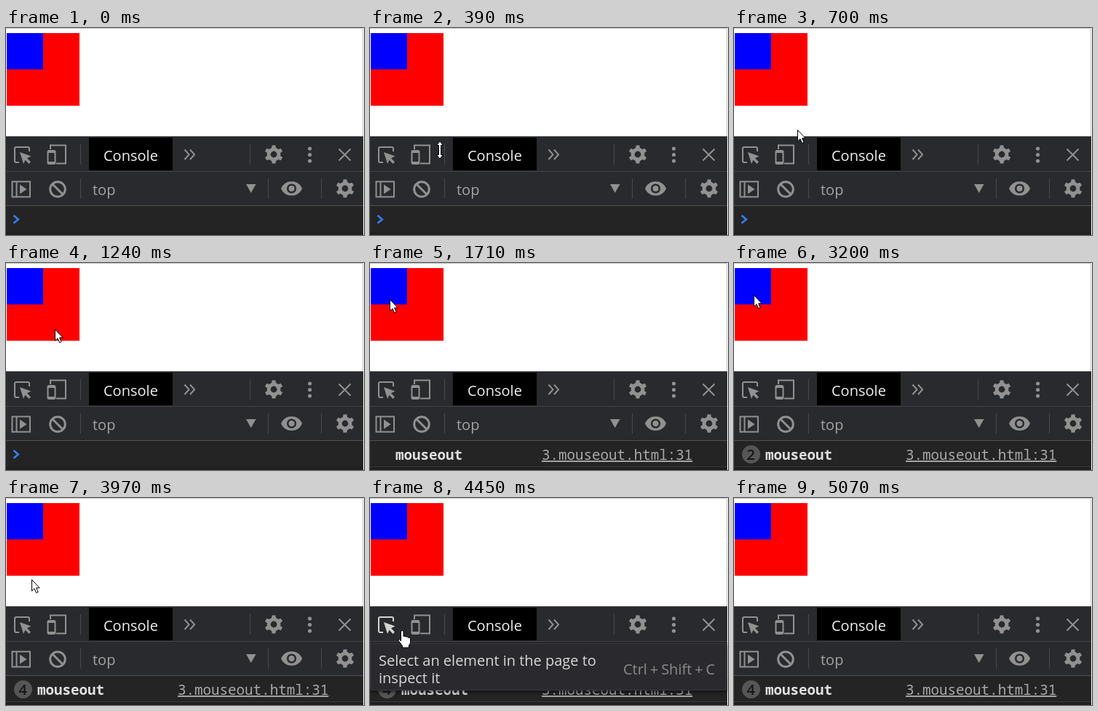
Animation of 492x285 px, one loop 5370 ms. Source, as an HTML page:

```html
<!DOCTYPE html>
<html lang="en">
<head>
<meta charset="utf-8">
<title>mouseout console</title>
<style>
  html, body { margin: 0; width: 100%; height: 100%; overflow: hidden; background: #fff; }
  svg { display: block; width: 492px; height: 285px; }
  text { font: 20px "Open Sans", "Noto Sans", sans-serif; white-space: pre; }
  .mono { font: 19.2px "Noto Sans Mono", "DejaVu Sans Mono", monospace; }
  .line { fill: none; stroke: #919191; stroke-width: 2; }
  .fill { fill: #919191; }
  .sep { stroke: #494a4d; stroke-width: 1; }
  .pointer { fill: #fff; stroke: #000; stroke-width: 1; stroke-linejoin: round; }
  #inspect.hover .line { stroke: #d4d4d4; }
  #inspect.hover .fill { fill: #d4d4d4; }
  .off { display: none; }
</style>
</head>
<body>
<svg viewBox="0 0 492 285">
  <defs>
    <path id="tooth" d="M-3.2-7 -2.4-12.5H2.4L3.2-7Z"/>
    <g id="gear" class="fill">
      <circle r="6.9" fill="none" stroke="#919191" stroke-width="5"/>
      <use href="#tooth"/>
      <use href="#tooth" transform="rotate(60)"/>
      <use href="#tooth" transform="rotate(120)"/>
      <use href="#tooth" transform="rotate(180)"/>
      <use href="#tooth" transform="rotate(240)"/>
      <use href="#tooth" transform="rotate(300)"/>
    </g>
    <filter id="shadow" x="-5%" y="-10%" width="110%" height="130%">
      <feDropShadow dx="0" dy="2" stdDeviation="2.5" flood-opacity=".6"/>
    </filter>
  </defs>

  <!-- page -->
  <path d="M0 .5H490.5V149" fill="none" stroke="#c4c4c4"/>
  <rect x="1" y="7" width="100" height="100" fill="#f00"/>
  <rect x="1" y="7" width="50" height="50" fill="#00f"/>

  <!-- panel -->
  <rect y="149" width="491" height="136" fill="#292a2d"/>
  <rect y="245" width="491" height="36" fill="#242424"/>
  <rect y="281" width="491" height="4" fill="#211e20"/>
  <path class="sep" d="M0 149.5H491M0 197.5H491" stroke-opacity=".8"/>
  <path d="M0 244.5H491" stroke="#505153"/>
  <path class="sep" d="M102.5 160V188M335.5 160V188M102.5 207V235M360.5 207V235M433.5 207V235"/>

  <!-- main toolbar -->
  <g id="inspect">
    <path class="line" d="M18 185H14Q12 185 12 183V166Q12 164 14 164H30Q32 164 32 166V170"/>
    <path class="fill" d="M19 171 34.5 176.5 29 179.2 34 184.5 31.5 187 26.5 181.8 24 187Z"/>
  </g>
  <path class="line" d="M61 167V161.5H82V186.5H69"/>
  <rect class="line" x="57.5" y="169" width="10" height="18" rx="1.5"/>
  <path class="line" d="M57.5 171H67.5M57.5 185H67.5"/>
  <rect x="114" y="151" width="115" height="45"/>
  <text x="134" y="183" fill="#f1f1f1">Console</text>
  <path class="line" d="M245.5 167.5 251.5 174.2 245.5 181M253 167.5 259 174.2 253 181"/>
  <use href="#gear" x="368" y="174"/>
  <g class="fill">
    <circle cx="417.5" cy="166" r="2.6"/>
    <circle cx="417.5" cy="174.5" r="2.6"/>
    <circle cx="417.5" cy="183" r="2.6"/>
  </g>
  <path class="line" stroke-width="2.5" d="M457.5 166.5 473.5 182.5M473.5 166.5 457.5 182.5"/>

  <!-- console toolbar -->
  <path class="line" d="M8.5 211.5H33V232.5H8.5ZM14.5 211.5V232.5"/>
  <path class="fill" d="M19 215.5 28.5 222 19 228.5Z"/>
  <g style="stroke-width:3">
    <circle class="line" style="stroke-width:3" cx="71" cy="222" r="10.3"/>
    <path class="line" style="stroke-width:3" d="M64 215 78 229"/>
  </g>
  <text x="119" y="230" fill="#a3a3a3">top</text>
  <path class="fill" d="M330 215H343.5L336.7 227Z"/>
  <path class="fill" d="M378 221C383 208 402 208 407 221C402 234 383 234 378 221Z"/>
  <circle cx="392.5" cy="221" r="6.6" fill="#292a2d"/>
  <circle class="fill" cx="392.5" cy="221" r="4"/>
  <use href="#gear" x="466" y="221"/>

  <!-- console -->
  <path id="prompt" d="M10.5 258 16.8 263.4 10.5 268.8" fill="none" stroke="#367cf1" stroke-width="2.6"/>
  <g id="log">
    <path d="M0 280.5H491" stroke="#3a3a3a"/>
    <g id="badge">
      <circle cx="23.5" cy="263.5" r="12.5" fill="#565656"/>
      <text id="count" x="23.3" y="271" text-anchor="middle" fill="#161616" style="font-weight:600"></text>
    </g>
    <text id="message" class="mono" y="271" fill="#e0e0e0" style="font-weight:600">mouseout</text>
    <text class="mono" x="236" y="271" fill="#a9a9a9" text-decoration="underline">3.mouseout.html:31</text>
  </g>

  <g id="tooltip">
    <rect x=".5" y="200.5" width="489" height="64" rx="3" fill="#292a2d" stroke="#38393c" filter="url(#shadow)"/>
    <text x="12" y="231" fill="#d8d8d8">Select an element in the page to</text>
    <text x="12" y="255" fill="#d8d8d8">inspect it</text>
    <text x="348" y="243" fill="#8b8b8b" style="word-spacing:-1.3px">Ctrl + Shift + C</text>
  </g>

  <g id="cursor" class="pointer">
    <path id="arrow" d="M.5 .5V16L4 12.7 6.6 18.6 9.1 17.5 6.6 11.8H11.2Z"/>
    <path id="resize" d="M0-12 4.5-6.5H1.5V6.5H4.5L0 12 -4.5 6.5H-1.5V-6.5H-4.5Z"/>
    <path id="hand" d="M-1.5 14V1Q-1.5-.5 .2-.5T2 1V7.5Q4.8 6 5.3 8.2Q7.8 7 8.4 9.2Q11.3 8.4 11.5 11V16.5L9.5 20V23H.5V20.5L-4.8 13.5Q-5.5 11.5-3.7 11.3Z"/>
  </g>
</svg>
<script>
  const LOOP = 5370, TICK = 78, LEAD = 18;

  // Pointer path: [tick, x, y]
  const path = [
    [1, 122, 272], [5, 96, 168], [7, 92, 157], [14, 74, 98], [16, 67, 91],
    [21, 29, 55], [28, 16, 17], [29, 16, 13], [31, 16, 4], [36, 16, 4],
    [41, 27, 44], [43, 30, 55], [50, 33, 100], [57, 44, 183], [64, 42, 282]
  ];
  const logTicks = [21, 31, 44, 51];

  const $ = id => document.getElementById(id);
  const show = (id, on) => $(id).classList.toggle('off', !on);

  function pointerAt(tick) {
    const next = path.findIndex(key => key[0] >= tick);
    if (tick < path[0][0] || next < 0) return null;
    const [t1, x1, y1] = path[next];
    const [t0, x0, y0] = path[Math.max(next - 1, 0)];
    const k = t1 > t0 ? (tick - t0) / (t1 - t0) : 1;
    return { x: Math.round(x0 + (x1 - x0) * k), y: Math.round(y0 + (y1 - y0) * k) };
  }

  function render(tick) {
    const pos = pointerAt(tick);
    const onBar = pos && pos.y >= 150 && pos.y <= 192;
    const onInspect = onBar && pos.x < 48;
    show('cursor', pos);
    if (pos) $('cursor').setAttribute('transform', `translate(${pos.x} ${pos.y})`);
    show('hand', onInspect);
    show('resize', onBar && !onInspect);
    show('arrow', !onBar);
    $('inspect').classList.toggle('hover', !!onInspect);

    const count = logTicks.filter(t => tick >= t).length;
    show('prompt', !count);
    show('log', count);
    show('badge', count > 1);
    $('count').textContent = count;
    $('message').setAttribute('x', count > 1 ? 43 : 35);
    show('tooltip', tick >= 56 && tick <= 58);
  }

  function frame() {
    const time = performance.now() % LOOP;
    render(Math.floor((time + LEAD) / TICK));
    requestAnimationFrame(frame);
  }
  frame();
</script>
</body>
</html>
```
